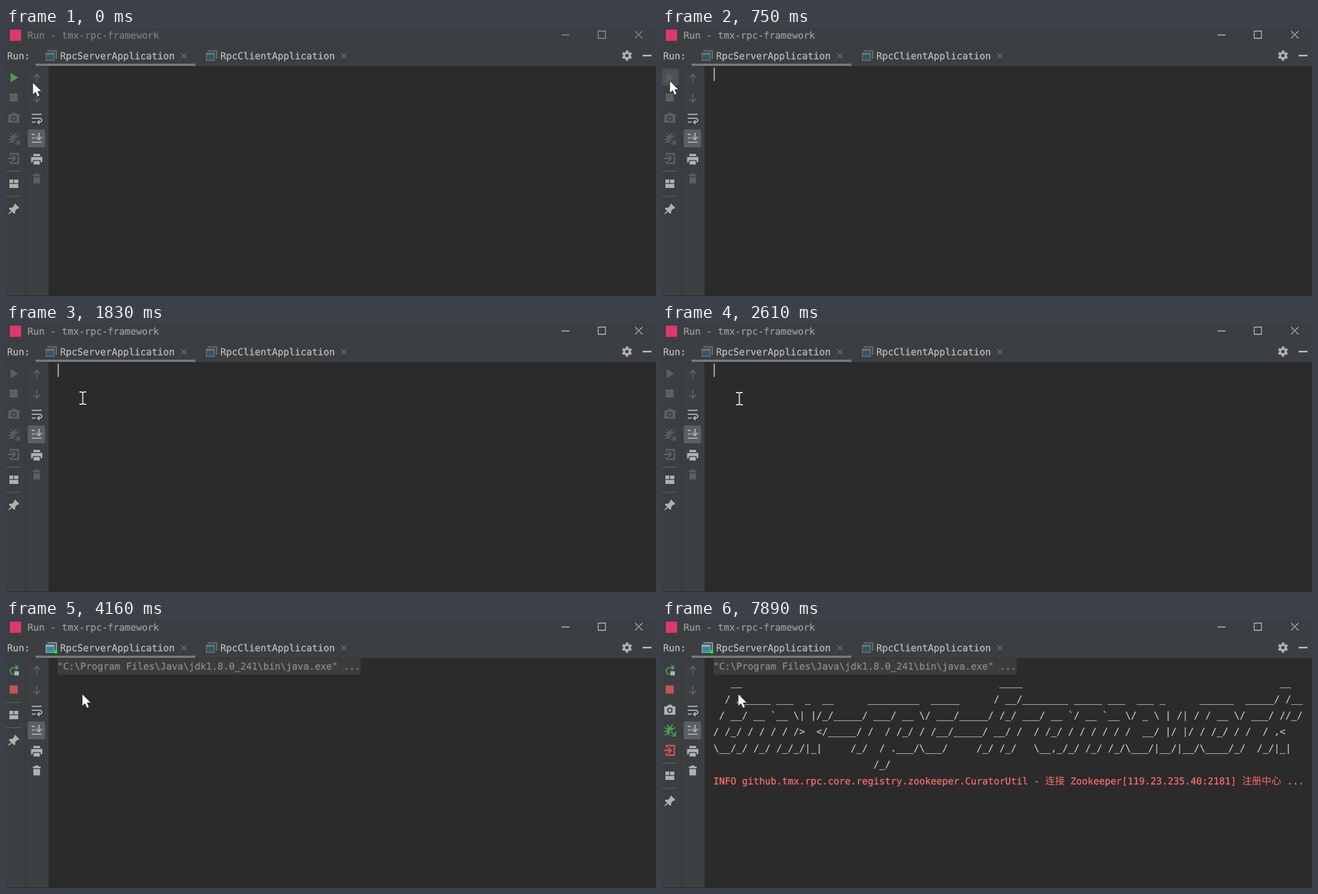
An HTML page for the animation above (8000 ms loop, 1164 by 481 pixels).

```html
<!DOCTYPE html>
<html lang="en">
<head>
<meta charset="utf-8">
<title>Run window</title>
<style>
html, body { margin: 0; width: 100%; height: 100%; overflow: hidden; background: #2b2b2b; }
svg { display: block; width: 1164px; height: 481px; }
text {
  font: 17.03px "DejaVu Sans Mono", "Noto Sans CJK SC", monospace;
  white-space: pre; text-rendering: geometricPrecision;
  fill: currentColor; stroke: currentColor; stroke-width: .3;
}
svg { color: #bbb; }
.cjk { font-size: 17.5px; font-weight: 300; stroke: none; }
.lit { color: #afb1b3; }
.dim { color: #5c5f61; }
.green { color: #499c54; }
.red { color: #c75450; }
.fill { fill: currentColor; }
.line { fill: none; stroke: currentColor; stroke-width: 2.2; }
.title { color: #7c7e80; }
.title.active { color: #999b9d; }
.title path { fill: none; stroke: #999b9d; stroke-width: 1.3; }
.title.active path { stroke: #c4c5c6; }
</style>
</head>
<body>
<svg viewBox="0 0 1164 481">
  <defs>
    <path id="run" class="fill" d="M8 80.5L22 89L8 97.5z"/>
    <rect id="stop" class="fill" x="6.500" y="117.500" width="14.500" height="14.500"/>
    <g id="camera">
      <path class="fill" fill-rule="evenodd" d="M4 155H9L11 152H17L19 155H24V170H4zM14 157a5 5 0 1 0 .01 0z"/>
      <circle class="fill" cx="14" cy="162" r="2.7"/>
    </g>
    <g id="bug">
      <ellipse class="fill" cx="14" cy="199" rx="5.500" ry="7.500"/>
      <path class="line" d="M9 188l3 4M19 188l-3 4M5 193l5 3M23 193l-5 3M4 200h5M5 207l5-4"/>
      <path d="M14 198h11v11h-11z" fill="#3c3f41"/>
      <path class="line" d="M16 200l7 7M24 200.500v7.500h-7.500"/>
    </g>
    <g id="exit">
      <path class="line" style="stroke-width:2.8" d="M8 229V225.500H22V242.500H8V239M4 234H16M11.500 229l5 5l-5 5"/>
    </g>
    <g id="tab">
      <path class="line" d="M74 41H90V55"/>
      <path class="fill" d="M71 44H87V59H71z"/>
      <path d="M72.500 48H85.500V57.500H72.500z" fill="var(--pane)"/>
    </g>
    <path id="close" d="M-5 -5L5 5M5 -5L-5 5" stroke="#6f7274" stroke-width="1.4"/>
    <path id="trash" class="fill" d="M48 263H52V261H58V263H62V266H48zM49 267.500H61V277Q61 279 59 279H51Q49 279 49 277z"/>
  </defs>

  <rect width="1164" height="69" fill="#3c3f41"/>
  <rect y="68" width="76" height="413" fill="#3c3f41"/>
  <path d="M0 30.500H1164M0 68.500H1164M34.500 69V481" stroke="#323436"/>
  <rect y="480" width="1164" height="1" fill="#292627"/>

  <rect x="7" y="3" width="20" height="20" fill="#e2376c"/>
  <g class="title" id="title">
    <text x="38.500" y="19">Run - tmx-rpc-framework</text>
    <path d="M995 12.500H1009M1060.500 5.500H1073.500V18.500H1060.500zM1126.500 5.500L1139.500 18.500M1139.500 5.500L1126.500 18.500"/>
  </g>

  <text x="2" y="56">Run:</text>
  <rect x="53" y="64" width="286" height="4" fill="#747a80"/>
  <g data-on="0-4160" color="#6b7174" style="--pane:#32596a"><use href="#tab"/></g>
  <g data-on="4160-8000" color="#9aa7b0" style="--pane:#358ca9">
    <use href="#tab"/><circle cx="89" cy="57" r="3.300" fill="#0de90d"/>
  </g>
  <g color="#6b7174" style="--pane:#32596a"><use href="#tab" x="287"/></g>
  <text x="97" y="56">RpcServerApplication</text>
  <text x="384" y="56">RpcClientApplication</text>
  <use href="#close" x="318.500" y="50"/>
  <use href="#close" x="605" y="50"/>
  <g fill="none" stroke="#afb1b3">
    <circle cx="1112" cy="49.500" r="5" stroke-width="4"/>
    <circle cx="1112" cy="49.500" r="7.700" stroke-width="3" stroke-dasharray="4.200 3.863" transform="rotate(14.400 1112 49.500)"/>
    <path d="M1140 49.500H1156" stroke-width="3"/>
  </g>

  <!-- left toolbar -->
  <rect data-on="270-580 750-1210" x="-4" y="73" width="34" height="30" rx="4" fill="#4c5052"/>
  <rect data-on="580-750" x="-4" y="73" width="34" height="30" rx="4" fill="#5c6164"/>
  <use data-on="0-750" href="#run" class="green"/>
  <use data-on="750-4160" href="#run" class="dim"/>
  <g data-on="4160-8000">
    <g class="green">
      <path class="line" d="M13.500 97.500A6 6 0 0 1 13.500 85.500H18"/>
      <path class="fill" d="M17 80L23.500 85.500L17 91z"/>
    </g>
    <rect x="15" y="92" width="8" height="7.500" fill="#afb1b3"/>
  </g>
  <use data-on="0-4160" href="#stop" class="dim"/>
  <use data-on="4160-8000" href="#stop" class="red"/>
  <g data-on="0-4020" class="dim"><use href="#camera"/><use href="#bug"/><use href="#exit"/></g>
  <g data-on="7890-8000">
    <use href="#camera" class="lit"/><use href="#bug" class="green"/><use href="#exit" class="red"/>
  </g>
  <g id="lower" class="lit">
    <path d="M0 257H28M0 302H28" stroke="#585b5d" stroke-width="1.500"/>
    <path class="fill" d="M6 272H13V278.500H6zM14.500 272H22V278.500H14.500zM6 280H22V287H6z"/>
    <path class="fill" d="M16 315L24 323L21.500 324.500L20.500 324L16.500 328L16.500 332.500L14.500 333.500L10.500 329.500L5.500 334.500L4 333.500L9 328L5 324L6.500 322.500L11 322.500L15 318.500L14.500 317z"/>
  </g>

  <!-- console toolbar -->
  <g class="dim">
    <path class="line" d="M55 98V83M49 89L55 83L61 89M55 118V133M49 127L55 133L61 127"/>
  </g>
  <g class="lit">
    <path class="line" d="M46 155H64M46 162H60.500A3.500 3.500 0 0 1 60.500 169H58M46 169H53"/>
    <path class="fill" d="M60 164.500V173.500L55 169z"/>
    <rect x="39" y="182" width="31" height="32" rx="4" fill="#586164"/>
    <path class="line" d="M46 191H52M46 197.500H52M46 205H64M59 188V200M54 195.500L59 200.500L64 195.500"/>
    <path class="fill" d="M49 226H61V230H49zM45 231.500H65V241H62V237H48V241H45zM49.500 238.500H60.500V245H49.500z"/>
  </g>
  <use data-on="0-4160" href="#trash" class="dim"/>
  <use data-on="4160-8000" href="#trash" class="lit"/>

  <!-- console -->
  <rect data-on="750-1210 1660-2150 2610-3220 3690-4020" x="92.500" y="71" width="2" height="24" fill="#bbb"/>
  <g data-on="4020-8000">
    <rect x="92" y="69" width="543" height="29" fill="#3c3c3c"/>
    <text x="92" y="89" color="#8c8c8c">"C:\Program Files\Java\jdk1.8.0_241\bin\java.exe" ...</text>
  </g>
  <g data-on="6350-8000">
    <text x="92" y="118.300">   __                                             ____                                             __</text>
    <text x="92" y="147.700">  / /_____ ___  _  __      _________  _____      / __/________ _____ ___  ___ _      ______  _____/ /__</text>
    <text x="92" y="177"> / __/ __ `__ \| |/_/_____/ ___/ __ \/ ___/_____/ /_/ ___/ __ `/ __ `__ \/ _ \ | /| / / __ \/ ___/ //_/</text>
    <text x="92" y="206.300">/ /_/ / / / / />  &lt;/_____/ /  / /_/ / /__/_____/ __/ /  / /_/ / / / / / /  __/ |/ |/ / /_/ / /  / ,&lt;</text>
    <text x="92" y="235.700">\__/_/ /_/ /_/_/|_|     /_/  / .___/\___/     /_/ /_/   \__,_/_/ /_/ /_/\___/|__/|__/\____/_/  /_/|_|</text>
    <text x="92" y="265">                            /_/</text>
  </g>
  <text data-on="7890-8000" x="92" y="294.500" color="#ff6b68">INFO github.tmx.rpc.core.registry.zookeeper.CuratorUtil - <tspan class="cjk">连接</tspan> Zookeeper[119.23.235.40:2181] <tspan class="cjk">注册中心</tspan> ...</text>

  <g id="pointer">
    <path data-on="0-1830 4020-8000" d="M0 0V21.500L5 17L8.600 25L12.200 23.300L8.800 15.600H15.500z" fill="#fff" stroke="#222" stroke-width=".7"/>
    <path data-on="1830-4020" d="M-6 -11H-2L0 -9.500L2 -11H6M0 -9.500V9.500M-6 11H-2L0 9.500L2 11H6" fill="none" stroke="#eee" stroke-width="1.800"/>
  </g>
</svg>
<script>
const LOOP = 8000;
const get = id => document.getElementById(id);
const parts = [...document.querySelectorAll("[data-on]")].map(el => ({
  el, spans: el.dataset.on.split(" ").map(s => s.split("-").map(Number))
}));
// Pointer steps: time, x, y
const path = [
  [0, 48, 98], [120, 35, 98], [270, 19, 98], [420, 14, 95], [1520, 16, 95],
  [1660, 48, 104], [1830, 137.5, 133], [1980, 138.5, 134], [4020, 136.5, 133]
];

function draw(now) {
  const t = now % LOOP;
  for (const { el, spans } of parts)
    el.style.display = spans.some(([a, b]) => t >= a && t < b) ? "" : "none";
  const [, x, y] = path.filter(p => p[0] <= t).pop();
  get("pointer").setAttribute("transform", `translate(${x} ${y})`);
  get("lower").setAttribute("transform", `translate(0 ${t >= 4020 && t < 7890 ? -109 : 0})`);
  get("title").classList.toggle("active", t >= 580);
}

const start = performance.now();
function tick() {
  draw(performance.now() - start);
  requestAnimationFrame(tick);
}
tick();
</script>
</body>
</html>
```
